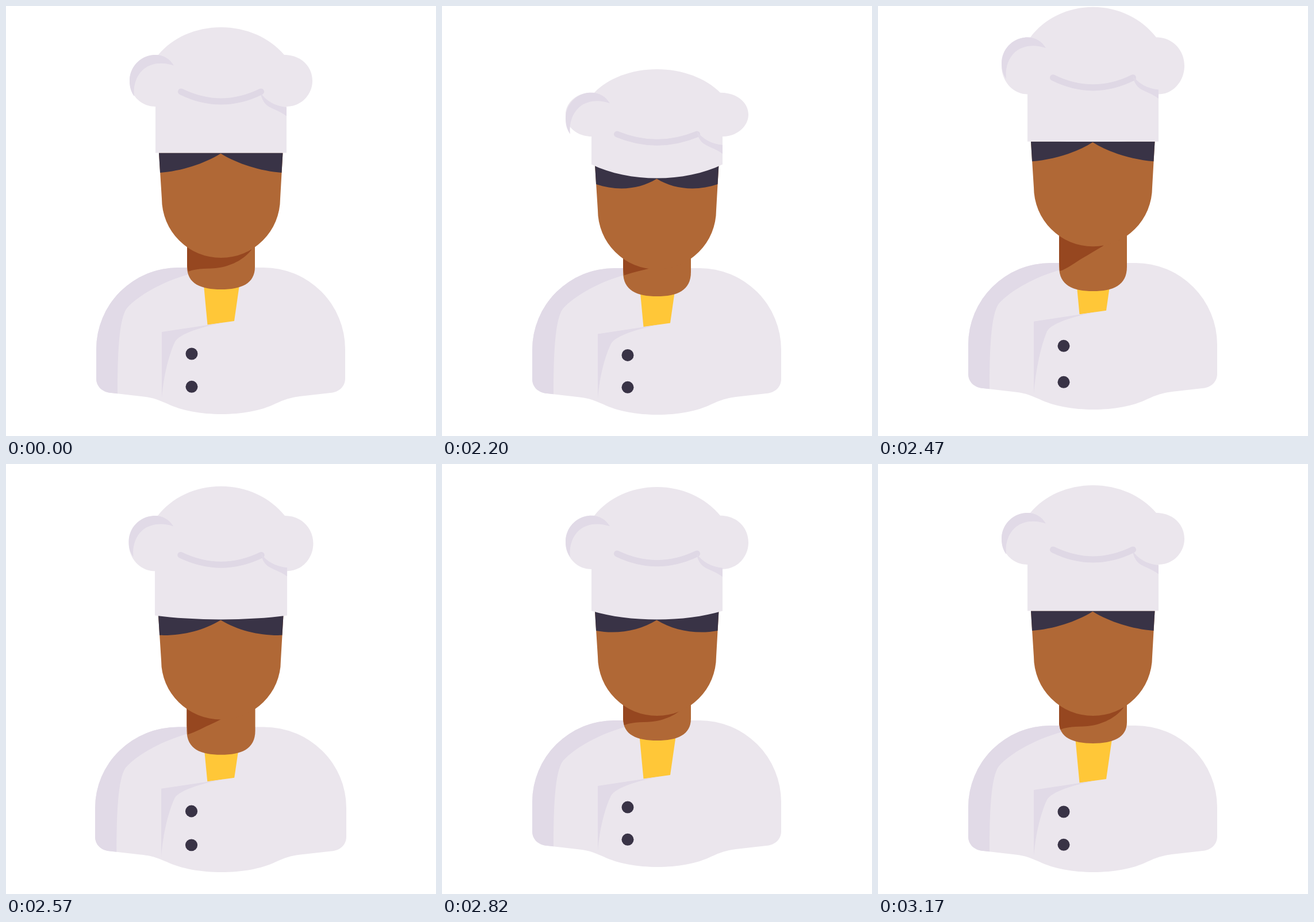
Animation, 748 px wide and 748 px high, one loop 3.2 s. Source, as an HTML page:

```html
<!DOCTYPE html>
<html lang="en">
<head>
<meta charset="utf-8">
<title>Chef</title>
<style>
  html, body { margin: 0; width: 100%; height: 100%; overflow: hidden; background: #fff; }
  svg { display: block; width: 100%; height: 100%; }
  .cloth { fill: #ebe6ed; }
  .fold { fill: #e1dae7; }
  .dark { fill: #393346; }
  .skin { fill: #b06836; }
  .shade { fill: #964720; }
  .scarf { fill: #ffc738; }
  .crease { fill: none; stroke: #dfd8e5; stroke-width: 11; stroke-linecap: round; }
</style>
</head>
<body>
<svg viewBox="0 0 748 748">
  <g id="chef">
    <path class="cloth" d="M157 597A143 142 0 0 1 300 455H448A142 142 0 0 1 590 597V648C590 662 579 672 564 673L511 679C495 681 485 684 468 692C420 716 330 716 281 692C262 684 255 681 235 679L183 673C168 672 157 662 157 648Z"/>
    <path class="fold" d="M300 455H320V466C270 480 228 505 210 526C196 545 194 610 194 674.300L183 673C168 672 157 662 157 648V597A143 142 0 0 1 300 455Z"/>
    <path class="scarf" id="scarf" d="M343 475H407.500L397 548L350.500 554.500Z"/>
    <path class="fold" id="flap"/>
    <circle class="dark" id="button" cx="323" cy="605" r="10.500"/>
    <circle class="dark" cx="323" cy="662.300" r="10.500"/>
    <path class="skin" id="neck"/>
    <path class="shade" id="shade"/>
    <path class="skin" id="face" d="M266 255.500L271 335A103 103 0 0 0 477 335L481.500 255.500Z"/>
    <path class="dark" id="hair"/>
    <path class="cloth" id="hat"/>
    <path class="crease" id="crease"/>
    <g class="fold" id="folds">
      <path d="M292 103.500C270 96 250 100 238 111C225 123 221 142 223 157C217 149 215 140 215 130C215 105 235 85 260 85C274 85 285 92 292 103.500Z"/>
      <path d="M443 151C452 165 468 174 488 176V191.500C476 182 461 179 453 172C447 166 444 159 443 151Z"/>
    </g>
  </g>
</svg>
<script>
const LOOP = 3200, STEP = 25;
const el = id => document.getElementById(id);
const set = (id, name, value) => el(id).setAttribute(name, value);
const shift = (id, y) => set(id, 'transform', `translate(0 ${y})`);
const mix = (a, b, p) => a + (b - a) * p;

const ramp = (t, a, b) => Math.min(1, Math.max(0, (t - a) / (b - a)));
const ease = u => (1 - Math.cos(Math.PI * u)) / 2;
// Rises from a to its peak of 1, then falls back to 0 at b.
const pulse = (t, a, peak, b) => ease(ramp(t, a, peak)) * ease(1 - ramp(t, peak, b));
const arc = (t, a, peak, b) => Math.sin(Math.PI / 2 * Math.min(ramp(t, a, peak), 1 - ramp(t, peak, b)));

// How much of each phase of the jump is present, mixed into every part's offset.
function pose(t) {
  const crouch = arc(t, 2000, 2110, 2200);
  const sink = pulse(t, 2025, 2200, 2490);
  const leap = pulse(t, 2200, 2490, 2700);
  const land = pulse(t, 2490, 2700, 2825);
  const settle = pulse(t, 2700, 2825, 3000);
  const rest = ease(ramp(t, 2825, 3000));
  return {
    drop: 15 * crouch + sink - 8 * leap + 15 * land - 9 * settle,
    squash: .021 * crouch + .026 * land,
    head: 19 * sink - 12 * leap + 33 * land + 9 * settle,
    bulge: 24 * sink + 19.5 * land + 15 * settle,
    crown: 53 * sink - 16 * leap + 5.5 * land + 3 * settle,
    puff: 32 * sink - 2 * leap + 10.5 * land + 8 * settle,
    crease: 54 * sink - 5 * leap + 10 * land + 7 * settle,
    collar: 2.5 * sink - 10.5 * leap + 8.5 * land + 2 * settle,
    neck: 11 * sink + 11 * leap + 10.5 * land - 3 * settle - 7 * rest,
    taut: .4 * sink + leap + .4 * land
  };
}

function drawHat(v) {
  const h = v.head, rim = 255.5 + h, dip = rim + v.bulge * 4 / 3;
  const lift = mix(v.puff, v.crown, .65);
  const hi = 85 + h + lift, lo = 175 + h + v.puff, mid = (hi + lo) / 2, arm = (lo - hi) * .275;
  const top = 37 + h + v.crown, dome = mix(hi, top, .62);
  set('hat', 'd', `M260 ${rim}V${lo}C235 ${lo} 215 ${mid + arm} 215 ${mid}C215 ${mid - arm} 235 ${hi} 260 ${hi}H265
    C289 ${dome} 330 ${top} 374 ${top}C418 ${top} 459 ${dome} 484 ${hi}
    C513 ${hi} 533 ${mid - arm} 533 ${mid}C533 ${mid + arm} 513 ${lo} 488 ${lo}V${rim}C422 ${dip} 326 ${dip} 260 ${rim}Z`);
  const y = 149 + h + v.crease;
  set('crease', 'd', `M304.500 ${y}Q374 ${y + 34 - v.crease * .1} 443.500 ${y}`);
  shift('folds', h + lift);
}

function drawHead(v) {
  const h = v.head, b = v.bulge;
  shift('face', h);
  const c1 = 287 + h + b * .65, c2 = 275 + h + b, peak = 256.5 + h + b;
  set('hair', 'd', `M266 ${255.5 + h}L268 ${290 + h}C305 ${c1} 344 ${c2} 373.500 ${peak}C403 ${c2} 443 ${c1} 479.500 ${290 + h}L481.500 ${255.5 + h}Z`);
}

function drawNeck(v) {
  const end = 493 + v.neck, side = 454 + v.neck * .7, arm = end - 10;
  set('neck', 'd', `M315 380V${side}C315 ${arm} 339 ${end} 374 ${end}C409 ${end} 433 ${arm} 433 ${side}V380Z`);
  // The shade's lower edge pulls straight as the neck stretches.
  const s = Math.max(0, v.head) * .14;
  const pt = (x, y, x2, y2) => `${mix(x, x2, v.taut)} ${mix(y, y2, v.taut) + s} `;
  set('shade', 'd', `M315 385V${452 + s}L${pt(317, 462, 316.5, 469)}
    C${pt(335, 455, 328, 466)}${pt(352, 458, 345, 453)}${pt(372, 455, 355, 447)}
    C${pt(395, 451, 367, 440)}${pt(416, 439, 380, 432)}${pt(427, 424, 392, 425)}V385Z`);
}

function drawCollar(c) {
  shift('scarf', c);
  shift('button', c * .55);
  set('flap', 'd', `M271 ${567 + c}L380 ${550.5 + c}C340 ${558 + c} 302 ${570 + c} 294 ${584 + c}C282 ${609 + c * .7} 273 650 271 684Z`);
}

function draw(t) {
  const v = pose(t);
  set('chef', 'transform', `translate(373.500 ${710 + v.drop}) scale(${1 + v.squash} ${1 - v.squash}) translate(-373.500 -710)`);
  drawCollar(v.collar);
  drawNeck(v);
  drawHead(v);
  drawHat(v);
}

function tick() {
  const t = performance.now() % LOOP;
  draw(Math.min(LOOP - STEP, Math.floor((t + 5) / STEP) * STEP));
  requestAnimationFrame(tick);
}
tick();
</script>
</body>
</html>
```
